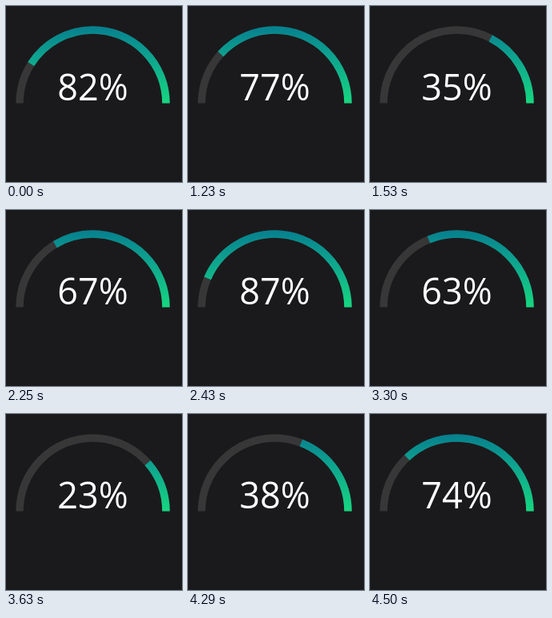
Recreate the animation shown at these times as an HTML page. Size 220 px wide and 220 px high, loop 4530 ms.

```html
<!DOCTYPE html>
<html lang="en">
<head>
<meta charset="utf-8">
<title>Gauge</title>
<style>
  html, body { margin: 0; height: 100%; overflow: hidden; background: #1a1a1c; }
  svg { display: block; width: 100%; height: 100%; }
  path { fill: none; stroke-width: 9.5; }
  text { font: 45px "Open Sans", "Noto Sans", sans-serif; fill: #fff; text-anchor: middle; }
</style>
</head>
<body>
<svg viewBox="0 0 220 220">
  <linearGradient id="teal" gradientUnits="userSpaceOnUse" x1="0" y1="25" x2="0" y2="121">
    <stop offset="0" stop-color="#067f8e"/>
    <stop offset=".4" stop-color="#0ea38f"/>
    <stop offset="1" stop-color="#16d680"/>
  </linearGradient>
  <path d="M200 121.5A91.5 91.5 0 0 0 17 121.5" stroke="#373738"/>
  <path id="bar" d="M200 121.5A91.5 91.5 0 0 0 17 121.5" pathLength="100" stroke="url(#teal)"/>
  <text id="label" x="108.5" y="117.5"></text>
</svg>
<script>
const LOOP = 4530, STEP = 30;
// start, duration, target, ease-out power
const moves = [
  [1200, 480, 26, 1.6],
  [2160, 540, 88, 6],
  [3180, 450, 23, 1.6],
  [4230, 430, 82, 2]
];
const bar = document.getElementById('bar');
const label = document.getElementById('label');

function valueAt(t) {
  let value = 82;
  for (const [start, duration, target, power] of moves) {
    const p = Math.min(1, Math.max(0, (t - start) / duration));
    value += (target - value) * (1 - (1 - p) ** power);
  }
  return value;
}

const begin = performance.now();
function draw() {
  const t = (performance.now() - begin) % LOOP;
  const value = valueAt(Math.floor(t / STEP) * STEP);
  bar.setAttribute('stroke-dasharray', `${value} 200`);
  label.textContent = Math.round(value) + '%';
  requestAnimationFrame(draw);
}
draw();
</script>
</body>
</html>
```
